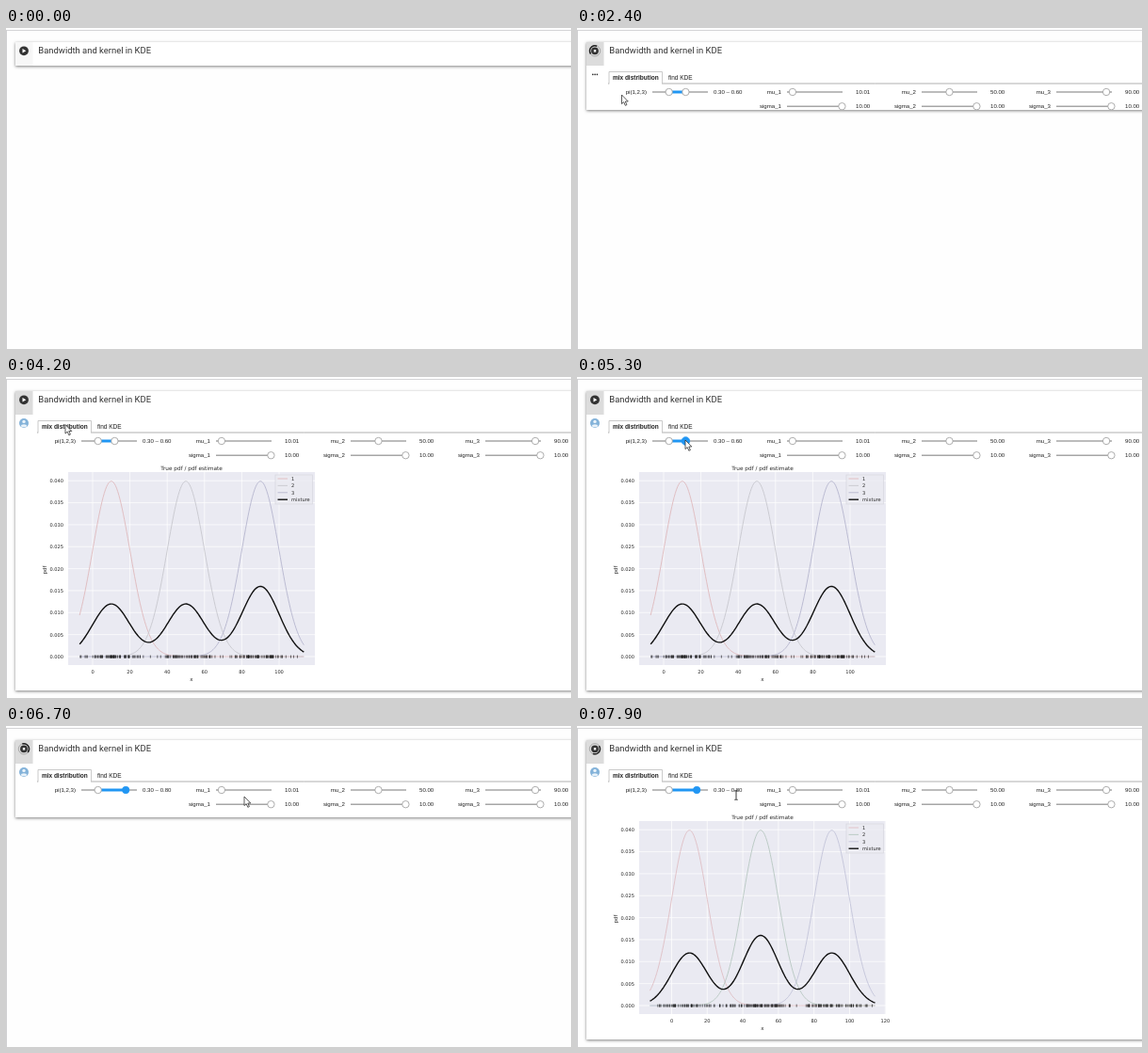
Write an HTML page with a canvas that moves like this. It is 600 px wide and 341 px high and loops after 8000 ms.

```html
<!DOCTYPE html>
<html lang="en">
<head>
<meta charset="utf-8">
<title>Bandwidth and kernel in KDE</title>
<style>
html, body { margin: 0; width: 100%; height: 100%; overflow: hidden; background: #fefefe; }
canvas { display: block; width: 600px; height: 341px; }
</style>
</head>
<body>
<canvas id="stage"></canvas>
<script>
const W = 600, H = 341, LOOP = 8000, STEP = 100;
const SANS = '"Liberation Sans", Arial, sans-serif';
const PLOT_FONT = '"DejaVu Sans", sans-serif';
const BLUE = '#2196f3';
const canvas = document.getElementById('stage');
const ctx = canvas.getContext('2d');
const dpr = window.devicePixelRatio || 1;
canvas.width = W * dpr;
canvas.height = H * dpr;

// time, x, y of the pointer tip
const PATH = [
  [100, 99, 181], [300, 72, 120], [500, 32, 52], [700, 15, 26], [1800, 15, 26],
  [2100, 32, 55], [2400, 47.5, 71], [2600, 62, 65], [2900, 104, 50], [3100, 104, 50],
  [3300, 63, 51], [4200, 63, 50.5], [4300, 278, 273], [4400, 265, 240],
  [4700, 190, 145], [5000, 117, 70], [5300, 115, 67], [5600, 127, 68],
  [5900, 127, 68], [6300, 205, 73], [6700, 253, 75], [7000, 222, 180],
  [7100, 214, 222], [7200, 212, 180], [7400, 208, 68], [7600, 208, 68],
  [7700, 250, 72], [7800, 200, 72], [7900, 169, 73]
];

// start time, bottom edge of the cell
const BOTTOM = [[0, 40], [1000, 80], [1900, 87], [2500, 97], [3000, 87], [3500, 333], [5800, 97], [6900, 333]];

const PLOTS = [
  { zero: 92, unit: 1.98, from: -7, to: 113.3, weights: [.3, .3, .4], last: 100, seed: 7,
    colors: ['#dfb9bd', '#c8c8cf', '#b6b6cf'] },
  { zero: 100.5, unit: 1.89, from: -12.2, to: 114.3, weights: [.3, .4, .3], last: 120, seed: 23,
    colors: ['#dfbfc4', '#b7c8c1', '#c3c4da'] }
];

function within(t, a, b) { return t >= a && t < b; }

function stepAt(list, t) {
  let value = list[0][1];
  for (const [start, v] of list) if (t >= start) value = v;
  return value;
}

function pointerAt(t) {
  if (t < PATH[0][0]) return null;
  for (let i = 1; i < PATH.length; i++) {
    const [t0, x0, y0] = PATH[i - 1], [t1, x1, y1] = PATH[i];
    if (t <= t1) {
      const k = (t - t0) / (t1 - t0);
      return [x0 + (x1 - x0) * k, y0 + (y1 - y0) * k];
    }
  }
  return PATH[PATH.length - 1].slice(1);
}

function random(seed) {
  return () => (seed = (seed * 16807) % 2147483647) / 2147483647;
}

function text(str, x, y, font, color = '#333', align = 'left') {
  ctx.font = font;
  ctx.fillStyle = color;
  ctx.textAlign = align;
  ctx.fillText(str, x, y);
}

function rect(x, y, w, h, color) {
  ctx.fillStyle = color;
  ctx.fillRect(x, y, w, h);
}

function line(x0, y0, x1, y1, color, width = 1) {
  ctx.strokeStyle = color;
  ctx.lineWidth = width;
  ctx.beginPath();
  ctx.moveTo(x0, y0);
  ctx.lineTo(x1, y1);
  ctx.stroke();
}

function disc(x, y, r, fill, stroke, width = 1) {
  ctx.beginPath();
  ctx.arc(x, y, r, 0, Math.PI * 2);
  if (fill) { ctx.fillStyle = fill; ctx.fill(); }
  if (stroke) { ctx.strokeStyle = stroke; ctx.lineWidth = width; ctx.stroke(); }
}

function polygon(points, fill, stroke, width = 1) {
  ctx.beginPath();
  points.forEach(([x, y]) => ctx.lineTo(x, y));
  ctx.closePath();
  ctx.fillStyle = fill;
  ctx.fill();
  if (stroke) { ctx.strokeStyle = stroke; ctx.lineWidth = width; ctx.stroke(); }
}

function drawCell(bottom) {
  rect(0, 0, W, H, '#fefefe');
  rect(0, 2, W, 1, '#d4d4d6');
  rect(0, 2, 1, H, '#d0d0d2');
  ctx.save();
  ctx.shadowColor = 'rgba(0,0,0,.5)';
  ctx.shadowBlur = 3 * dpr;
  ctx.shadowOffsetY = dpr;
  rect(10, 15, W, bottom - 15, '#fff');
  ctx.restore();
}

function drawRunButton(t) {
  const busy = within(t, 900, 3800) || within(t, 5500, 7300) || t >= 7700;
  rect(10, 15, 18.5, 25, t < 900 ? '#f7f7f7' : '#dcdcdc');
  if (!busy) {
    disc(19, 24.3, 4.9, '#333');
    polygon([[17.5, 22], [17.5, 26.6], [21.3, 24.3]], '#fff');
    return;
  }
  const a = t / 1000 * Math.PI * 2;
  disc(19, 24.3, 5.7, null, '#888', .6);
  ctx.strokeStyle = '#222';
  ctx.lineWidth = 1.5;
  ctx.beginPath();
  ctx.arc(19, 24.3, 5.5, a, a + 2.6);
  ctx.stroke();
  disc(19, 24.3, 3.9, '#333');
  rect(17.8, 23.1, 2.4, 2.4, '#fff');
}

function drawStatus(t) {
  if (t < 1000) return;
  if (t < 3800) {
    for (let i = 0; i < 3; i++) disc(16.8 + i * 2.3, 49.3, .85, '#333');
    return;
  }
  disc(19, 49, 5, '#83b2d9');
  disc(19, 47.4, 1.7, '#eaf3fa');
  ctx.beginPath();
  ctx.ellipse(19, 51.8, 3, 1.5, 0, 0, Math.PI * 2);
  ctx.fillStyle = '#eaf3fa';
  ctx.fill();
}

function drawTab(label, x, w, active, hover) {
  const top = 46.5, base = 59.5;
  if (active || hover) {
    rect(x, top, w, base - top + (active ? 1 : 0), active ? '#fff' : '#dcdcdc');
    ctx.strokeStyle = '#bdbdbd';
    ctx.lineWidth = .8;
    ctx.beginPath();
    ctx.moveTo(x, base);
    ctx.lineTo(x, top);
    ctx.lineTo(x + w, top);
    ctx.lineTo(x + w, base);
    ctx.stroke();
  }
  text(label, x + w / 2, 54.8, `${active ? 'bold ' : ''}6.5px ${SANS}`, '#222', 'center');
}

function drawTabs(second, hoverFirst, hoverSecond) {
  line(33, 59, W, 59, '#a8a8a8', .9);
  drawTab('mix distribution', 34, second ? 51 : 56.5, !second, hoverFirst);
  drawTab('find KDE', second ? 87.5 : 92.5, 34.5, second, hoverSecond);
}

function drawThumb(x, y, on, big) {
  disc(x, y, big ? 4.3 : 3.7, on ? BLUE : '#fff', on ? BLUE : '#9a9a9a', .8);
}

function drawSlider(label, x, y, share, value) {
  const font = `6.1px ${SANS}`;
  text(label, x - 6, y + 2.2, font, '#222', 'right');
  line(x, y, x + 59, y, '#a6a6a6', 1.6);
  drawThumb(x + 59 * share, y);
  text(value, x + 73, y + 2.2, font, '#222');
}

function drawSliders(t) {
  const y = 68;
  const high = .6 + .2 * Math.min(1, Math.max(0, (t - 5300) / 300));
  const font = `6.1px ${SANS}`;
  text('pi(1,2,3)', 74, y + 2.2, font, '#222', 'right');
  line(80, y, 139, y, '#a6a6a6', 1.6);
  line(97.7, y, 80 + 59 * high, y, BLUE, 3);
  drawThumb(97.7, y);
  drawThumb(80 + 59 * high, y, t >= 5200, within(t, 5200, 6100));
  text(`0.30 – ${high.toFixed(2)}`, 145, y + 2.2, font, '#222');
  const means = [10.01, 50, 90];
  means.forEach((mu, i) => {
    const x = 223 + 143 * i;
    drawSlider(`mu_${i + 1}`, x, y, mu / 100, mu.toFixed(2));
    drawSlider(`sigma_${i + 1}`, x, y + 15.2, .99, '10.00');
  });
}

function bell(x, i) {
  const z = (x - 10 - 40 * i) / 10;
  return Math.exp(-z * z / 2) / (10 * Math.sqrt(2 * Math.PI));
}

function drawPlot(p) {
  const px = x => p.zero + p.unit * x, py = v => 297 - v * 4670;
  const small = `5.1px ${PLOT_FONT}`, ink = '#262626';
  rect(66, 101, 262, 205, '#eaeaf2');
  for (let x = 0; x <= p.last; x += 20) {
    line(px(x), 101, px(x), 306, '#fff', .7);
    text(x, px(x), 315, small, ink, 'center');
  }
  for (let i = 0; i < 9; i++) {
    const v = i * .005;
    line(66, py(v), 328, py(v), '#fff', .7);
    text(v.toFixed(3), 61, py(v) + 1.9, small, ink, 'right');
  }
  text('True pdf / pdf estimate', 197, 98.8, `5.75px ${PLOT_FONT}`, ink, 'center');
  text('x', 197, 323, `5.5px ${PLOT_FONT}`, ink, 'center');
  ctx.save();
  ctx.translate(42.5, 205);
  ctx.rotate(-Math.PI / 2);
  text('pdf', 0, 0, `5.5px ${PLOT_FONT}`, ink, 'center');
  ctx.restore();

  const curve = (f, color, width) => {
    ctx.strokeStyle = color;
    ctx.lineWidth = width;
    ctx.beginPath();
    for (let k = 0; k <= 200; k++) {
      const x = p.from + (p.to - p.from) * k / 200;
      ctx.lineTo(px(x), py(f(x)));
    }
    ctx.stroke();
  };
  p.colors.forEach((c, i) => curve(x => bell(x, i), c, .9));
  curve(x => p.weights.reduce((sum, w, i) => sum + w * bell(x, i), 0), '#111', 1.4);
  drawRug(p, px);
  drawLegend(p, small, ink);
}

function drawRug(p, px) {
  const rnd = random(p.seed * 7919);
  for (let k = 0; k < 200; k++) {
    const u = rnd();
    const i = u < p.weights[0] ? 0 : u < p.weights[0] + p.weights[1] ? 1 : 2;
    const z = Math.sqrt(-2 * Math.log(rnd())) * Math.cos(2 * Math.PI * rnd());
    const x = 10 + 40 * i + 10 * z;
    if (x >= p.from && x <= p.to) line(px(x), 295.6, px(x), 298.6, '#111', .6);
  }
}

function drawLegend(p, font, ink) {
  rect(286, 104, 39.5, 31, 'rgba(234,234,242,.8)');
  ctx.strokeStyle = '#d2d2da';
  ctx.lineWidth = .6;
  ctx.strokeRect(286, 104, 39.5, 31);
  ['1', '2', '3', 'mixture'].forEach((name, i) => {
    const y = 108 + 7.4 * i;
    line(288.5, y, 299, y, p.colors[i] || '#111', i < 3 ? .9 : 1.4);
    text(name, 303, y + 1.9, font, ink);
  });
}

function drawPointer(t) {
  const at = pointerAt(t);
  if (!at) return;
  const [x, y] = at;
  if (t >= 7900) {
    line(x, y - 4, x, y + 5, '#222', .9);
    line(x - 1.8, y - 4.3, x + 1.8, y - 4.3, '#222', .8);
    line(x - 1.8, y + 5.3, x + 1.8, y + 5.3, '#222', .8);
    return;
  }
  const arrow = [[0, 0], [0, 9.6], [2.2, 7.6], [3.8, 11.3], [5.4, 10.6], [3.8, 7], [6.8, 7]];
  polygon(arrow.map(([dx, dy]) => [x + dx, y + dy]), '#fff', '#333', .8);
}

function draw(t) {
  ctx.setTransform(dpr, 0, 0, dpr, 0, 0);
  ctx.textBaseline = 'alphabetic';
  const bottom = stepAt(BOTTOM, t);
  drawCell(bottom);
  drawRunButton(t);
  text('Bandwidth and kernel in KDE', 34.3, 27.4, '9.43px Roboto, sans-serif', '#333');
  drawStatus(t);
  if (t >= 1800) {
    const second = within(t, 3000, 3500);
    ctx.save();
    ctx.beginPath();
    ctx.rect(10, 15, W, bottom - 15);
    ctx.clip();
    drawTabs(second, within(t, 3300, 3500), within(t, 2900, 3000));
    if (!second && t >= 1900) drawSliders(t);
    if (within(t, 3500, 5600)) drawPlot(PLOTS[0]);
    if (t >= 6900) drawPlot(PLOTS[1]);
    ctx.restore();
  }
  drawPointer(t);
}

const start = performance.now();
function tick() {
  const t = (performance.now() - start) % LOOP;
  draw(Math.floor(t / STEP) * STEP);
  requestAnimationFrame(tick);
}
tick();
</script>
</body>
</html>
```
